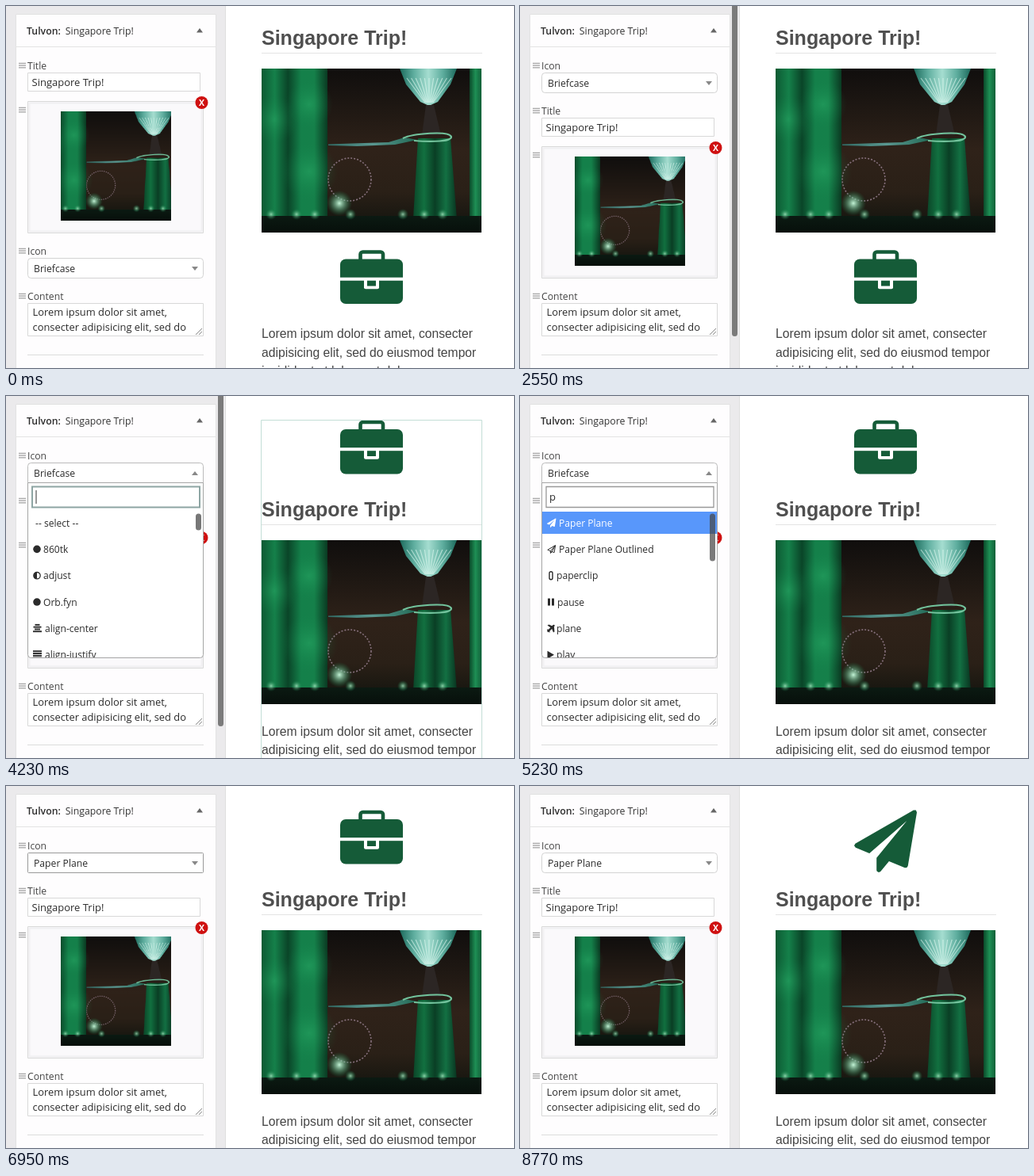
Recreate the animation shown at these times as an HTML page with a canvas. Size 640 px wide and 457 px high, loop 8810 ms.

```html
<!DOCTYPE html>
<html lang="en">
<head>
<meta charset="utf-8">
<title>Widget editor</title>
<style>
html, body { margin: 0; width: 100%; height: 100%; overflow: hidden; background: #fff; }
canvas { display: block; width: 100vw; height: 100vh; }
</style>
</head>
<body>
<canvas id="stage" width="640" height="457"></canvas>
<script>
const LOOP = 8810;
const DRAG_START = 700, DROP = 2200;
const RELOAD = [[2850, 3640], [7080, 8020]]; // fade start, new page shown
const OPEN = 3900, TYPED = [5000, 5260, 5540], PICK = 6760;
const BAR_ON = 1060, BAR_OFF = 4900;
const GREEN = '#155b38', INK = '#2b2b2b';
const SANS = '"Open Sans", sans-serif';
const ARIAL = '"Liberation Sans", Arial, sans-serif';

const canvas = document.getElementById('stage');
let c = canvas.getContext('2d');

function rect(x, y, w, h, fill) {
  c.fillStyle = fill;
  c.fillRect(x, y, w, h);
}

function box(x, y, w, h, r, fill, stroke, line = 1) {
  c.beginPath();
  c.roundRect(x, y, w, h, r);
  if (fill) { c.fillStyle = fill; c.fill(); }
  if (stroke) { c.strokeStyle = stroke; c.lineWidth = line; c.stroke(); }
}

function text(s, x, y, size, color = INK, family = SANS, weight = 400) {
  c.font = `${weight} ${size}px ${family}`;
  c.fillStyle = color;
  c.fillText(s, x, y);
}

function poly(points, fill) {
  c.beginPath();
  points.forEach(([x, y]) => c.lineTo(x, y));
  c.closePath();
  if (fill) { c.fillStyle = fill; c.fill(); }
}

function disc(x, y, r, fill) {
  c.beginPath();
  c.arc(x, y, r, 0, 7);
  c.fillStyle = fill;
  c.fill();
}

function ring(x, y, r, color, line) {
  c.beginPath();
  c.arc(x, y, r, 0, 7);
  c.strokeStyle = color;
  c.lineWidth = line;
  c.stroke();
}

function at(x, y, scale, draw) {
  c.save();
  c.translate(x, y);
  c.scale(scale, scale);
  draw();
  c.restore();
}

function blend(x0, y0, x1, y1, ...colors) {
  const g = c.createLinearGradient(x0, y0, x1, y1);
  colors.forEach((k, i) => g.addColorStop(i / (colors.length - 1), k));
  return g;
}

function glow(x, y, r, color) {
  const g = c.createRadialGradient(x, y, 0, x, y, r);
  g.addColorStop(0, color);
  g.addColorStop(1, 'rgba(20,140,80,0)');
  rect(x - r, y - r, 2 * r, 2 * r, g);
}

// Night garden in flat shapes and soft gradients
function paintPhoto() {
  const pic = document.createElement('canvas');
  pic.width = 277;
  pic.height = 207;
  const main = c;
  c = pic.getContext('2d');
  rect(0, 0, 277, 207, blend(0, 0, 0, 207, '#100e0d', '#1f1813', '#2f2219', '#2a2017', '#0f120d'));
  c.setLineDash([2, 2]);
  ring(111, 140, 27, '#86707c', 1.6);
  c.setLineDash([]);
  rect(0, 0, 83, 192, blend(0, 0, 83, 0, '#0d5a33', '#15804a', '#0a4528', '#14804a', '#15804a', '#0a3a22'));
  glow(16, 64, 30, 'rgba(50,190,115,.35)');
  glow(60, 45, 30, 'rgba(50,190,115,.35)');
  glow(60, 130, 36, 'rgba(50,190,115,.35)');
  poly([[174, 0], [246, 0], [238, 20], [222, 42], [211, 47], [200, 42], [182, 20]],
    blend(174, 0, 246, 0, '#1c6a5c', '#5fae9f', '#a5ddd0', '#5fae9f', '#1c6a5c'));
  c.strokeStyle = 'rgba(225,250,242,.6)';
  c.lineWidth = 1.2;
  c.beginPath();
  for (let i = -5; i <= 5; i++) {
    c.moveTo(211 + i, 43);
    c.lineTo(211 + i * 5.6, 12);
  }
  c.stroke();
  poly([[207, 46], [217, 46], [226, 84], [202, 84]], '#2c2624');
  poly([[197, 88], [238, 88], [246, 190], [191, 190]],
    blend(191, 0, 246, 0, '#0b4528', '#127040', '#0a3f25', '#137043', '#093420'));
  rect(262, 0, 15, 190, blend(262, 0, 277, 0, '#0b4a2a', '#1e8f55', '#106038'));
  poly([[84, 95.5], [160, 93], [180, 87], [196, 90], [168, 96], [120, 98], [84, 97]],
    blend(84, 0, 196, 0, '#316b65', '#5a9790', '#226a55'));
  c.beginPath();
  c.moveTo(178, 88);
  c.bezierCurveTo(190, 82, 236, 78, 239, 86);
  c.bezierCurveTo(240, 92, 215, 93, 192, 91);
  c.strokeStyle = '#72c39c';
  c.lineWidth = 2.2;
  c.stroke();
  rect(0, 186, 277, 21, blend(0, 186, 0, 207, '#0b1a12', '#070f0b'));
  glow(98, 170, 16, 'rgba(205,255,225,.95)');
  for (const x of [12, 44, 67, 112, 178, 205, 228]) glow(x, 184, 7, 'rgba(170,235,195,.8)');
  c = main;
  return pic;
}
const photo = paintPhoto();

function briefcase() {
  box(25.5, 3, 28.5, 16, 3, null, GREEN, 4.6);
  box(0, 12, 79, 56.5, 7, GREEN);
  rect(0, 35.2, 79, 4, '#fff');
  box(30, 36, 19, 13.7, 2, '#fff');
  rect(34, 39.2, 11, 6.8, GREEN);
}

const PLANE = [[77.8, 0.5], [79, 3.3], [67.7, 71], [66.3, 73], [63.9, 73.2], [43.9, 65], [33.2, 78],
  [31, 79], [28.7, 77.8], [28.2, 76.2], [28.2, 60.8], [66.3, 14.1], [19.2, 54.9], [1.8, 47.8],
  [0, 45.3], [1.4, 42.7], [74.8, 0.4]];

const paperPlane = color => poly(PLANE, color);

function openPlane(color) {
  poly([[76, 4], [65, 70], [36, 59], [6, 46]]);
  c.lineWidth = 7;
  c.lineJoin = 'round';
  c.strokeStyle = color;
  c.stroke();
  poly([[72, 9], [32, 57], [32, 76], [45, 64]]);
  c.stroke();
}

function airliner(color) {
  c.strokeStyle = color;
  c.lineCap = 'round';
  c.lineWidth = 2.4;
  c.beginPath();
  c.moveTo(1.5, 9); c.lineTo(8.5, 2);
  c.stroke();
  poly([[0.5, 1.5], [2.5, 0.5], [9, 3.5], [9.5, 9.5], [8, 10.5], [6, 5.5]], color);
  poly([[0, 6.5], [3, 7], [3.7, 10.5], [2.8, 10.5], [2, 8.6], [0, 7.7]], color);
}

function bars(color, widths) {
  widths.forEach((w, i) => rect((11 - w) / 2, i * 2.8, w, 1.9, color));
}

const triangle = (x, y, s) => [[x, y - s], [x + s * 1.7, y], [x, y + s]];

// Icons share an 11 px cell
const ICONS = {
  dot: k => disc(5, 5.5, 4.8, k),
  adjust: k => {
    ring(5, 5.5, 4.2, k, 1.3);
    c.beginPath();
    c.arc(5, 5.5, 4, Math.PI / 2, Math.PI * 1.5);
    c.fillStyle = k;
    c.fill();
  },
  center: k => bars(k, [6, 10, 7, 11]),
  justify: k => bars(k, [11, 11, 11, 11]),
  plane: k => at(0, 0, 0.145, () => paperPlane(k)),
  outlined: k => at(0, 0, 0.14, () => openPlane(k)),
  airliner,
  play: k => poly(triangle(0.5, 5.5, 5), k),
  playDisc: k => { disc(5, 5.5, 5, k); poly(triangle(3.7, 5.5, 2.3), '#fff'); },
  playRing: k => { ring(5, 5.5, 4.3, k, 1.3); poly(triangle(3.7, 5.5, 2.3), k); },
  clip: k => box(3, 0.5, 4, 10, 2, null, k, 1.4),
  pause: k => { rect(1, 1, 3, 9, k); rect(6, 1, 3, 9, k); }
};

const ALL = [[null, '-- select --', 37], ['dot', '860tk', 47], ['adjust', 'adjust', 47],
  ['dot', 'Orb.fyn', 47], ['center', 'align-center', 49], ['justify', 'align-justify', 49]];
const PLANES = [['plane', 'Paper Plane', 49], ['outlined', 'Paper Plane Outlined', 49]];
const P_LIST = [...PLANES, ['clip', 'paperclip', 46], ['pause', 'pause', 47],
  ['airliner', 'plane', 46], ['play', 'play', 46]];
const PLA_LIST = [...PLANES, ['airliner', 'plane', 46], ['play', 'play', 46],
  ['playDisc', 'Play Circle', 47], ['playRing', 'Play Circle Outlined', 47]];

function grip(x, y) {
  for (let i = -1; i < 2; i++) rect(x + 16, y + i * 2.7 - 0.6, 9, 1.4, '#aaa');
}

function label(s, x, y) {
  grip(x, y);
  text(s, x + 27, y + 4.5, 12.2, '#444');
}

function titleItem(y) {
  label('Title', 0, y);
  box(27.5, y + 9.5, 217, 23, 0, '#fff', '#d8d8d8');
  text('Singapore Trip!', 32.5, y + 26, 13);
}

function imageItem(y) {
  grip(0, y + 10);
  box(27.5, y - 0.5, 221, 166, 0, '#faf9fb', '#d9d9d9');
  box(29.5, y + 1.5, 217, 162, 0, null, '#f0eff1', 2);
  c.drawImage(photo, 34.5, 0, 208, 207, 68.5, y + 12, 139, 138);
  disc(246.5, y + 1, 8, '#cf1111');
  c.textAlign = 'center';
  text('X', 246.5, y + 4.7, 10.5, '#fff', SANS, 700);
  c.textAlign = 'left';
}

function iconItem(x, y, value, open, focus) {
  label('Icon', x, y);
  box(x + 27.5, y + 9.5, 221, 25, open ? [4, 4, 0, 0] : focus ? 1 : 4, '#fff',
    focus ? '#999' : open ? '#bbb' : '#d3d3d3');
  text(value, x + 35, y + 27, 12.2);
  const s = open ? -1 : 1, ay = y + 22.5;
  poly([[x + 234, ay - 2.5 * s], [x + 242, ay - 2.5 * s], [x + 238, ay + 2.5 * s]], '#888');
}

function contentItem(y) {
  label('Content', 0, y);
  box(27.5, y + 9.5, 221, 41, 0, '#fff', '#d8d8d8');
  text('Lorem ipsum dolor sit amet,', 33.5, y + 25, 12.9);
  text('consecter adipisicing elit, sed do', 33.5, y + 43.5, 12.9);
  c.strokeStyle = '#888';
  c.lineWidth = 1;
  c.beginPath();
  for (const d of [4, 8]) {
    c.moveTo(247 - d, y + 49);
    c.lineTo(247, y + 49 - d);
  }
  c.stroke();
  rect(27, y + 74, 222, 1, '#dcdcdc');
  text('Image Size', 27, y + 102, 12.2, '#555');
}

function dropdown(t) {
  const n = TYPED.filter(k => t >= k).length;
  const list = [ALL, P_LIST, PLA_LIST, PLA_LIST][n];
  box(27.5, 109.5, 221, 221, [0, 0, 4, 4], '#fff', '#a5a5a5');
  box(33, 114.5, 211, 26, 0, '#fff', n ? '#999' : '#8da5a3', n ? 1.3 : 2);
  if (n) text('pla'.slice(0, n), 37, 132, 13);
  else rect(37.5, 119, 1, 17, '#333');
  c.save();
  c.beginPath();
  c.rect(28, 143, 220, 187);
  c.clip();
  list.forEach(([icon, name, x], i) => {
    const y = 160 + i * 33.35, lit = n && i === 0;
    const color = lit ? '#fff' : INK;
    if (lit) rect(28, 146, 220, 28, '#5897fb');
    if (icon) at(34, y - 5.5, 1, () => ICONS[icon](color));
    text(name, x, y + 4.5, 12.1, color);
  });
  c.restore();
  const barLength = [21, 60, 133, 133][n];
  box(239, 148.5, 7, barLength, 3.5, n ? 'rgba(70,70,70,.72)' : '#777');
}

// Path of the dragged field: time, x shift, y
const PATH = [[DRAG_START, 0, 309], [950, 15, 288], [1250, 25, 180], [1480, 24, 110],
  [1560, 24, 109], [1850, 14, 80], [DROP, 3, 75]];

function dragPos(t) {
  const i = Math.max(1, PATH.findIndex(p => p[0] >= t));
  const [a, b] = [PATH[i - 1], PATH[i]];
  const u = (t - a[0]) / (b[0] - a[0]);
  const e = u * u * (3 - 2 * u);
  return [a[1] + (b[1] - a[1]) * e, a[2] + (b[2] - a[2]) * e];
}

function sidebar(t) {
  rect(0, 0, 277, 457, '#ebeaec');
  rect(276, 0, 1, 457, '#dfdfdf');
  box(12.5, 10.5, 252, 460, 0, '#fefdfe', '#e2e2e2');
  rect(12, 51, 253, 1, '#e4e4e4');
  text('Tulvon:', 26, 35.5, 12.3, INK, SANS, 600);
  text('Singapore Trip!', 74.8, 35.5, 12.3, '#333');
  poly([[240, 33.5], [248, 33.5], [244, 28]], '#666');

  const dragging = t >= DRAG_START && t < DROP;
  const open = t >= OPEN && t < PICK;
  const value = t >= PICK ? 'Paper Plane' : 'Briefcase';
  const [dx, dy] = dragging ? dragPos(t) : [0, 0];
  const slot = dragging ? (dy > 215 ? 2 : dy > 95 ? 1 : 0) : t < DROP ? 2 : 0;

  const order = ['title', 'image'];
  order.splice(slot, 0, 'icon');
  let y = 75;
  for (const name of order) {
    if (name === 'title') { titleItem(y); y += 46; }
    else if (name === 'image') { imageItem(y); y += 188; }
    else if (dragging) {
      c.setLineDash([2, 2]);
      box(22.5, y - 0.5, 226, 25, 0, '#fff', '#d5d5d5');
      c.setLineDash([]);
      y += 44;
    } else {
      iconItem(0, y, value, open, t >= PICK && t < 8000);
      y += 57;
    }
  }
  contentItem(y);
  if (dragging) {
    c.save();
    c.beginPath();
    c.rect(0, 0, 268, 457);
    c.clip();
    iconItem(dx, dy, value);
    c.restore();
  }
  if (open) dropdown(t);

  const shade = Math.min(1, (BAR_OFF + 250 - t) / 250);
  if (t >= BAR_ON && shade > 0) {
    c.globalAlpha = shade;
    box(267, -5, 7, 422, 3.5, '#7b7b7b');
    c.globalAlpha = 1;
  }
}

function preview(t) {
  rect(277, 0, 363, 457, '#fff');
  const iconFirst = t >= RELOAD[0][1];
  const shift = iconFirst ? 103 : 0;
  text('Singapore Trip!', 322, 49 + shift, 25, '#4f4f4f', ARIAL, 700);
  rect(322, 59 + shift, 278, 1, '#e4e4e4');
  c.drawImage(photo, 322, 79 + shift);
  at(421, iconFirst ? 30 : 307.5, 1, t >= RELOAD[1][1] ? () => paperPlane(GREEN) : briefcase);
  ['Lorem ipsum dolor sit amet, consecter', 'adipisicing elit, sed do eiusmod tempor',
    'incididunt ut labore et dolore'].forEach((s, i) =>
    text(s, 322, (iconFirst ? 428.5 : 419) + i * 23.7, 15.7, '#444', ARIAL));

  if (iconFirst && t < 4750) {
    c.globalAlpha = Math.min(1, (4750 - t) / 400);
    box(321.5, 30.5, 278, 440, 0, null, '#c3ded6');
    c.globalAlpha = 1;
  }
  for (const [start, end] of RELOAD) {
    if (t < start || t >= end) continue;
    const veil = 0.7 * Math.min(1, (t - start) / 320);
    rect(277, 0, 363, 457, `rgba(255,255,255,${veil})`);
  }
}

let began = null;
function frame(now) {
  if (began === null) began = now;
  const t = (now - began) % LOOP;
  preview(t);
  sidebar(t);
  requestAnimationFrame(frame);
}
requestAnimationFrame(frame);
</script>
</body>
</html>
```
